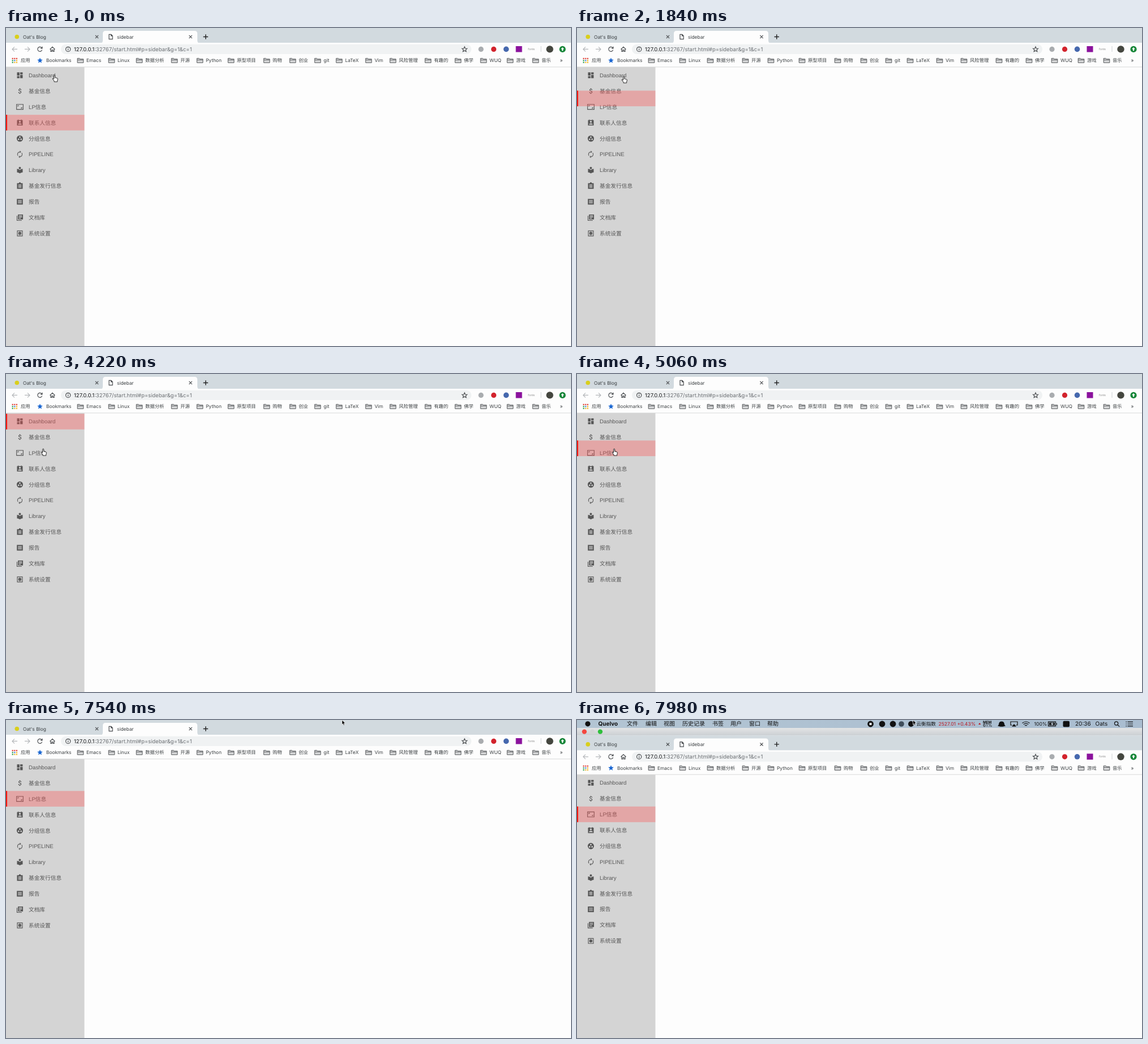
Animation of 998x561 px, one loop 8 s. Source, as an HTML page:

```html
<!DOCTYPE html>
<html lang="zh-CN">
<head>
<meta charset="utf-8">
<title>sidebar</title>
<style>
html, body { margin: 0; width: 100%; height: 100%; overflow: hidden; background: #fdfdfd; }
svg { display: block; width: 100%; height: 100%; text-rendering: geometricPrecision; }
text { font-family: Inter, "Noto Sans CJK SC", "Noto Sans CJK", sans-serif; font-size: 8.4px; fill: #3c4043; white-space: pre; }
#sidebar text { font-family: "Liberation Sans", "Noto Sans CJK SC", "Noto Sans CJK", sans-serif; font-size: 9.7px; fill: #585858; }
#menu text { font-size: 10px; fill: #111; }
.line { fill: none; stroke: #4a4d50; stroke-width: 1.2; }
</style>
</head>
<body>
<svg id="stage" viewBox="0 0 998 561" xmlns="http://www.w3.org/2000/svg">
  <defs>
    <linearGradient id="titleFill" x2="0" y2="1"><stop stop-color="#e4e5e6"/><stop offset="1" stop-color="#cbcfd3"/></linearGradient>
    <linearGradient id="menuFill" x2="1" y2="0"><stop stop-color="#b3c5d3"/><stop offset="1" stop-color="#a9bdd0"/></linearGradient>
  </defs>
  <g id="window">
    <rect y="-14" width="998" height="14" fill="url(#titleFill)"/>
    <rect width="998" height="26.5" fill="#d2dadf"/>
    <rect y="26" width="998" height="550" fill="#fdfdfd"/>
    <g id="toolbar"></g>
    <rect y="68.3" width="998" height="1" fill="#d9dadb"/>
    <g id="sidebar"><rect y="69" width="138.5" height="500" fill="#d4d4d4"/></g>
    <g id="highlight">
      <rect width="138.5" height="27.6" fill="rgb(255,80,80)" fill-opacity=".35"/>
      <rect width="2" height="27.6" fill="#f5140c"/>
    </g>
  </g>
  <g id="menu"><rect width="998" height="14" fill="url(#menuFill)"/></g>
  <g id="cursor" stroke-linejoin="round">
    <path id="hand" fill="#fff" stroke="#111" stroke-width=".9" d="M-2.3-5a1 1 0 0 1 2 0v3.6l3.6.8q1.3.4 1.1 1.7l-.7 3v1.8h-5.7v-1.6L-4.6 1q-.6-1.5.8-1.2l1.5 1.2z"/>
    <path id="arrow" fill="#000" stroke="#fff" stroke-width=".7" d="M0 0v8.2l1.8-1.7 1.3 2.9 1.5-.6-1.3-2.9h2.6z"/>
  </g>
</svg>
<script>
const $ = id => document.getElementById(id);
const add = (id, markup) => $(id).insertAdjacentHTML('beforeend', markup);
const label = (x, y, s, attrs = '') => `<text x="${x}" y="${y}" ${attrs}>${s}</text>`;
const dot = (x, y, r, color) => `<circle cx="${x}" cy="${y}" r="${r}" fill="${color}"/>`;
const box = (x, y, w, h, color, r = 0) => `<rect x="${x}" y="${y}" width="${w}" height="${h}" rx="${r}" fill="${color}"/>`;
const line = (d, attrs = '') => `<path class="line" d="${d}" ${attrs}/>`;
const shape = (d, color) => `<path d="${d}" fill="${color}"/>`;
const ring = (x, y, r) => `M${x - r} ${y}a${r} ${r} 0 1 0 ${2 * r} 0a${r} ${r} 0 1 0 ${-2 * r} 0z`;

// Browser tabs and toolbar
const cross = x => line(`M${x - 2.6} 12.9l5.2 5.2m0-5.2l-5.2 5.2`);
add('toolbar', [
  dot(13, -6.8, 4.2, '#f4473f'), dot(27, -6.8, 4.2, '#d3d5d6'), dot(41, -6.8, 4.2, '#2fbf3c'),
  shape('M166 27q5 0 5-5V10q0-5 5-5H333q5 0 5 5v12q0 5 5 5z', '#fdfdfd'),
  dot(19.3, 15.5, 3.8, '#d9cf1c'),
  label(30, 18.5, "Oat's Blog"), cross(160.5),
  line('M182 11.3h3.8l2.4 2.4v6H182zM185.6 11.3v2.6h2.6', 'stroke-width="1"'),
  label(196, 18.5, 'sidebar'), cross(326),
  line('M348.5 15.5h8.4M352.7 11.3v8.4', 'style="stroke:#222;stroke-width:1.4"'),
  line('M20 37.4H11m4-4l-4 4 4 4', 'style="stroke:#b4b7ba"'),
  line('M33 37.4h9m-4-4l4 4-4 4', 'style="stroke:#b4b7ba"'),
  line('M63.3 35.2A4 4 0 1 0 63.7 38.6M64 32.8v3h-3'),
  line('M77.5 37.6l4.5-4.2 4.5 4.2M79 37v4.4h2v-2.6h2v2.6h2V37'),
  box(97, 28.7, 725, 17.3, '#f0f2f3', 8.6),
  line(ring(109.7, 37.4, 4.1), 'stroke-width="1"'), line('M109.7 36.8v2.8M109.7 34.8v1'),
  label(120, 40.9, '<tspan fill="#17191b">127.0.0.1</tspan>:32767/start.html#p=sidebar&amp;g=1&amp;c=1', 'style="font-size:9.5px;fill:#6b6f73"'),
  line('M810 33l1.3 3 3.2.3-2.4 2.1.7 3.2-2.8-1.7-2.8 1.7.7-3.2-2.4-2.1 3.2-.3z', 'stroke-width="1"'),
  dot(839, 37.4, 4.6, '#a9acaf'), dot(861.5, 37.4, 4.6, '#d2222c'),
  dot(883.5, 37.4, 4.8, '#4668ae'), box(900.5, 32, 11, 10.5, '#8b129d'),
  label(922, 38.6, 'fonts', 'style="font-size:5px;fill:#888"'),
  box(944.5, 32, 1, 10, '#cfd2d5'), dot(960.5, 37.4, 6.2, '#44463f'),
  dot(983, 37.4, 5.6, '#148537'), shape('M983 34l3 3.2h-1.9v3h-2.2v-3H980z', '#fff')
].join(''));

// Bookmarks bar
const appColors = ['#e0433a', '#e0433a', '#e0433a', '#36a152', '#3f7fe8', '#efb72a', '#36a152', '#efb72a', '#efb72a'];
add('toolbar', appColors.map((c, i) => box(10.6 + i % 3 * 3.6, 52.8 + (i / 3 | 0) * 3.4, 2.2, 2.2, c)).join('') +
  label(26, 60.2, '应用') +
  shape('M60 52.4l1.4 3.2 3.4.3-2.6 2.2.8 3.4-3-1.8-3 1.8.8-3.4-2.6-2.2 3.4-.3z', '#1a67d2') +
  label(71, 60.2, 'Bookmarks') + label(978.5, 60.2, '»'));
const bookmarks = {
  142: 'Emacs', 197: 'Linux', 246: '数据分析', 308: '开源', 353: 'Python', 408: '原型项目',
  471: '购物', 517: '创业', 561: 'git', 599: 'LaTeX', 651: 'Vim', 694: '风险管理',
  756: '有趣的', 809: '佛学', 854: 'WUQ', 901: '游戏', 946: '音乐'
};
for (const [x, name] of Object.entries(bookmarks)) {
  add('toolbar', label(x, 60.2, name) +
    `<path transform="translate(${x - 15.8} 53)" d="M0 .5h4l1 1.3h5.6v6.4H0zM0 3.3h10.6" fill="#d6d7d8" stroke="#55585b"/>`);
}

// Sidebar entries: label, filled path, stroked path (24-unit icons)
const bars = (x, w) => [7, 11, 15].map(y => `M${x} ${y}v2h${w}v-2z`).join('');
const items = [
  ['Dashboard', 'M3 3h8v10H3zM3 15h8v6H3zM13 11h8v10h-8zM13 3h8v6h-8z'],
  ['基金信息', '', 'M16 9C16 5 8.5 5 8.5 8.7S16 11 16 15.2 8 19 8 15M12 3v3M12 18v3'],
  ['LP信息', '', 'M1.5 4h21v16h-21zM5.5 11V8H9M18.5 13v3H15'],
  ['联系人信息', 'M3 4h3V2h2v2h8V2h2v2h3v17H3z' + ring(12, 9, 3) + 'M6 18h12c0-3-4-4-6-4s-6 1-6 4z'],
  ['分组信息', ring(12, 12, 10) + ring(8, 14.5, 2.5) + ring(16, 14.5, 2.5) + ring(12, 7.7, 2.5)],
  ['PIPELINE', 'M12 0v8l4-4zM12 24v-8l-4 4z', 'M6 16.6A7.6 7.6 0 0 1 12 4.4M18 7.4A7.6 7.6 0 0 1 12 19.6'],
  ['Library', ring(12, 5, 3.6) + 'M12 11.5Q8 8 3 8v11q5 0 9 3.5 4-3.5 9-3.5V8q-5 0-9 3.5z'],
  ['基金发行信息', 'M3 3h6a3 3 0 0 1 6 0h6v18H3z' + bars(7, 10)],
  ['报告', 'M2.5 3h19v18h-19z' + bars(6, 12)],
  ['文档库', 'M2 6h2v14h14v2H2zM6 2h16v16H6zM9 5v2h10V5zM9 9v2h10V9zM9 13v2h6v-2z'],
  ['系统设置', ring(12, 12, 4.5) + ring(12, 12, 1.8), 'M4 4h16v16H4zM12 6v12M6.8 9l10.4 6M6.8 15l10.4-6']
];
const ROW = 27.9, TOP = 69.4;
items.forEach(([name, filled, stroked = ''], i) => {
  const y = 83.4 + i * ROW;
  add('sidebar', label(40, y + 3.5, name) +
    `<g transform="translate(17.8 ${y - 6.7}) scale(.556)"><path d="${filled}" fill="#565656" fill-rule="evenodd"/>` +
    `<path d="${stroked}" fill="none" stroke="#565656" stroke-width="2"/></g>`);
});

// System menu bar
const menuNames = { 88: '文件', 121: '编辑', 153: '视图', 186: '历史记录', 239: '书签', 271: '用户', 304: '窗口', 336: '帮助' };
const small = (size, color = '#111') => `style="font-size:${size}px;fill:${color}"`;
const dark = 'style="stroke:#111"';
add('menu', [
  dot(19, 6.8, 4.6, '#111'), label(37.5, 10.3, 'Quelvo', 'font-weight="700"'),
  ...Object.entries(menuNames).map(([x, s]) => label(x, 10.4, s)),
  dot(518.5, 7, 5.4, '#111'), box(516.5, 5, 4, 4, '#e8edf2'),
  dot(539, 7, 5.4, '#111'), dot(558, 7, 5.4, '#111'), dot(573, 7, 4.8, '#3f4d5a'), dot(590, 7, 5, '#111'),
  label(599.5, 10.2, '云衡指数', small(8.6)),
  label(638.5, 10.2, '2527.01 +0.43%', small(8.6, '#b91822')), shape('M709 8l2.2-3 2.2 3z', '#b91822'),
  label(717, 5.8, 'MEM', small(6.2) + ' font-weight="700"'), label(717, 12.3, '61%', small(8.2)),
  shape('M743 10.5q2-1 2.2-4 .6-4 4.8-4t4.8 4q.2 3 2.2 4l-5 1.2h-4z', '#111'),
  line('M768.5 9H766V3h12v6h-2.5', dark), shape('M768 11.5l4-4.6 4 4.6z', '#111'),
  line('M786.5 5.5q6.5-5 13 0M788.8 7.8q4.2-3.2 8.4 0M791 10q2-1.4 4 0', dark),
  label(807.5, 10, '100%', small(8.6)),
  line('M832.5 3.2h13v7.4h-13zM847.3 5.5v3', dark), box(834, 4.6, 10, 4.6, '#111'),
  shape('M840.5 3.5l-4 4h2.6l-1 3 4-4.2h-2.6z', '#c3d0dc'),
  box(858.5, 1.8, 11.5, 10.4, '#111', 2),
  label(880, 10.3, '20:36'), label(915.5, 10.3, 'Oats'),
  line(ring(952.6, 6, 3.1) + 'M954.9 8.3l3.3 3.3', dark),
  line('M969.5 3.4h1.4m1.6 0h9.5M969.5 7h1.4m1.6 0h9.5M969.5 10.6h1.4m1.6 0h9.5', dark)
].join(''));

// Motion is measured in steps; every three steps last 100, 20 and 20 ms.
const stepAt = ms => {
  if (ms < 20) return 0;
  const rest = (ms - 20) % 140;
  return 1 + 3 * Math.floor((ms - 20) / 140) + (rest < 100 ? 0 : rest < 120 ? 1 : 2);
};
const swing = (step, start, length) => {
  const p = Math.min(1, Math.max(0, (step - start) / length));
  return 0.5 - Math.cos(Math.PI * p) / 2;
};
// start step, length, dx, dy
const cursorMoves = [[28, 10, -3, 2], [48, 9, -12, 32], [62, 12, -5, 15], [146, 13, 526.5, -138]];

function draw(ms) {
  const step = stepAt(ms);
  const row = 3 - 3 * swing(step, 26.6, 26.5) + 2 * swing(step, 89, 26.5);
  $('highlight').setAttribute('transform', `translate(0 ${TOP + row * ROW})`);

  const reveal = swing(step, 161, 9);
  $('window').setAttribute('transform', `translate(0 ${27.4 * reveal})`);
  $('menu').setAttribute('transform', `translate(0 ${14 * (reveal - 1)})`);

  let x = 87, y = 89;
  for (const [start, length, dx, dy] of cursorMoves) {
    const k = swing(step, start, length);
    x += dx * k;
    y += dy * k;
  }
  $('cursor').setAttribute('transform', `translate(${x} ${y})`);
  $('hand').style.display = x < 138 ? '' : 'none';
  $('arrow').style.display = x < 138 ? 'none' : '';
}
const tick = () => {
  draw(performance.now() % 8000);
  requestAnimationFrame(tick);
};
tick();
</script>
</body>
</html>
```
